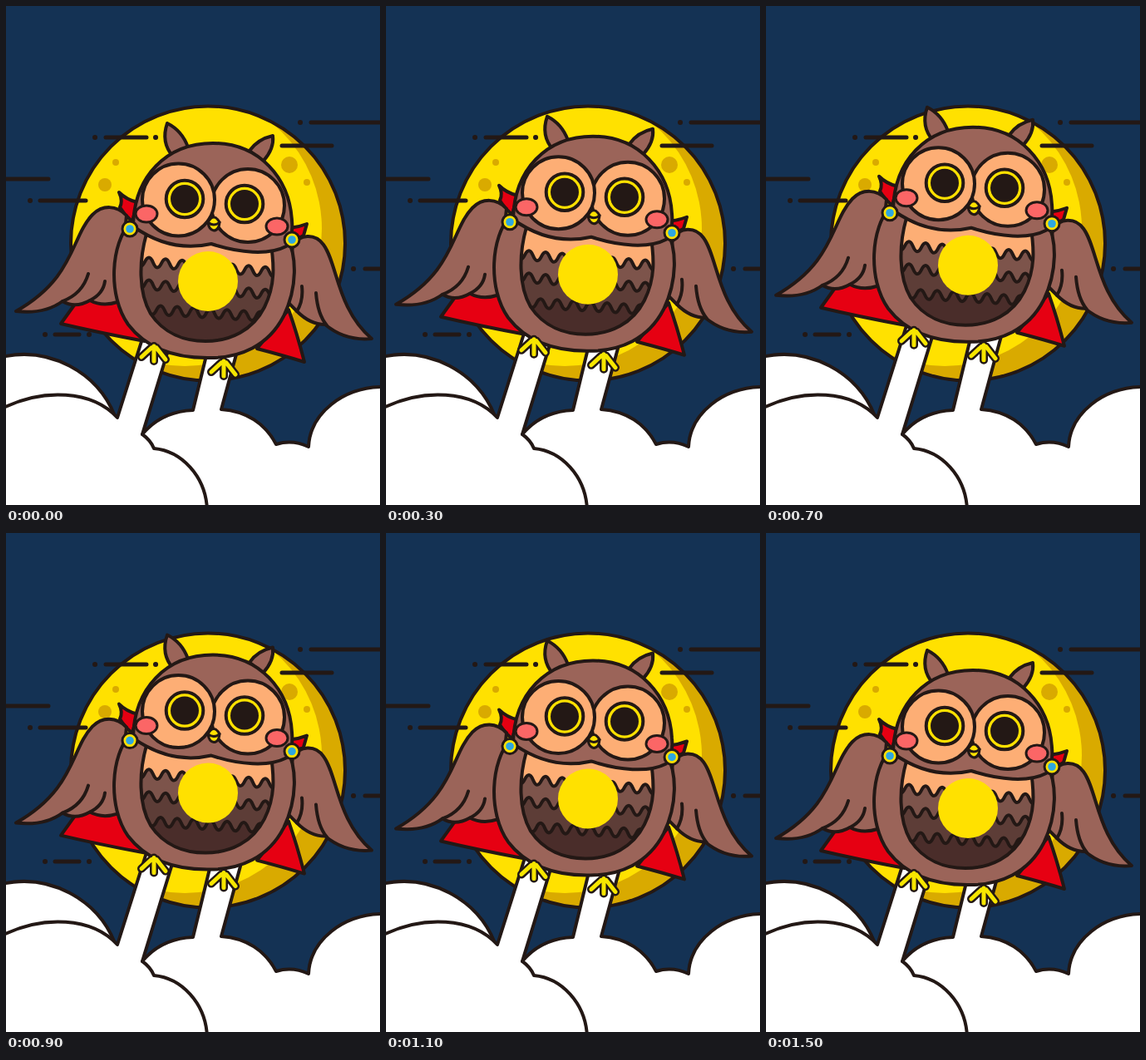
Write an HTML page that moves like this. It is 450 px wide and 600 px high and loops after 1.6 s.

```html
<!DOCTYPE html>
<html lang="en">
<head>
<meta charset="utf-8">
<title>Flying owl</title>
<style>
html, body { margin: 0; width: 100%; height: 100%; overflow: hidden; background: #143254; }
svg { display: block; width: 450px; height: 600px; }
.ink { stroke: #231815; stroke-width: 4; stroke-linecap: round; stroke-linejoin: round; }
.brown { fill: #9b6459; }
.red { fill: #e60012; }
.peach { fill: #fdae75; }
.yellow { fill: #ffe100; }
.shade { fill: #d9aa00; }
.cheek { fill: #fb6666; }
.white { fill: #fff; }
.line { fill: none; }
</style>
</head>
<body>
<svg viewBox="0 0 450 600">
  <defs>
    <circle id="moon" cx="243" cy="285.5" r="165"/>
    <clipPath id="moonClip"><use href="#moon"/></clipPath>
    <path id="bellyShape" d="M169 274C160 306 159 344 174 370C190 394 215 403 240 403C270 403 297 390 311 362C324 336 323 312 318 280Z"/>
    <clipPath id="bellyClip"><use href="#bellyShape"/></clipPath>
    <g id="eye">
      <circle r="22.3" class="yellow ink"/>
      <circle r="17" fill="#231815"/>
    </g>
    <g id="earring">
      <circle r="9" class="yellow ink" style="stroke-width:3"/>
      <circle r="4.8" fill="#2ea7e0"/>
    </g>
    <path id="toes" d="M-3 0L-15 11M0 -2V16M3 0L14 14"/>
    <g id="feet">
      <use href="#toes" x="178" y="411"/>
      <use href="#toes" x="262" y="429"/>
    </g>
  </defs>

  <rect width="450" height="600" fill="#143254"/>

  <g clip-path="url(#moonClip)">
    <use href="#moon" class="shade"/>
    <circle cx="215" cy="268" r="165" class="yellow"/>
  </g>
  <g class="shade">
    <circle cx="119" cy="215" r="8"/><circle cx="132" cy="188" r="4"/>
    <circle cx="341" cy="191" r="10"/><circle cx="362" cy="212" r="4"/>
  </g>
  <use href="#moon" class="line ink"/>

  <path class="line ink" style="stroke-width:5" d="M120 158H169M367 140H455M332 168H392M-5 208H51M41 234H96M432 316H455M59 395H88"/>
  <path class="line ink" style="stroke-width:6" d="M107 158h.1M180 158h.1M354 140h.1M29 234h.1M418 316h.1M47 395h.1M100 395h.1"/>

  <g class="white ink">
    <path d="M-5 422C52 409 110 440 131 493V610H-5Z"/>
    <path d="M-5 484C45 459 104 462 134 495L172 375H207L164 515C179 497 199 487 225 486L252 375H289L259 485C289 487 312 502 325 527Q345 521 364 530C366 490 405 458 455 458V610H-5Z"/>
    <path d="M164 515Q174 522 178 532C211 535 240 565 242 605" class="line"/>
  </g>

  <g id="owl">
    <g class="red ink">
      <path d="M89 350L66 382Q113 393 167 403L140 350Z"/>
      <path d="M340 365Q350 393 359 428Q333 420 302 412Z"/>
      <path d="M136 224Q145 233 158 236L152 259Q143 252 137 242Q141 234 136 224Z"/>
      <path d="M362 262Q352 266 341 267L344 283L358 276Z"/>
    </g>
    <g class="brown ink">
      <path d="M145 252C133 239 116 239 104 251C78 278 83 327 12 367Q46 371 68 355Q83 364 101 354Q116 362 134 356Z"/>
      <path d="M345 288C353 274 372 273 382 287C399 310 398 364 440 400Q408 403 384 383Q366 383 350 367L338 355Z"/>
      <path class="line" d="M99 322Q92 346 68 355M119 331Q117 346 101 354M373 345Q375 371 386 384M356 337Q358 354 350 367"/>
      <path d="M150 260C126 285 122 348 147 383C170 413 205 423 242 423C282 424 316 408 334 373C351 338 350 300 338 278Z"/>
    </g>

    <g clip-path="url(#bellyClip)">
      <rect x="155" y="270" width="175" height="140" class="peach"/>
      <g id="bands" class="ink"></g>
    </g>
    <use href="#bellyShape" class="line ink"/>
    <circle cx="243" cy="331" r="36" class="yellow"/>

    <g class="brown ink">
      <path d="M201 181Q186 164 194 141Q212 150 219 170Z"/>
      <path d="M293 174Q303 160 321 156Q323 172 309 187Z"/>
      <path d="M153 265C154 205 193 165 249 165C305 165 341 207 344 258Q346 280 337 289C316 300 280 297 247 286C216 293 184 287 153 265Z"/>
    </g>
    <circle cx="291" cy="240" r="44" class="peach ink"/>
    <circle cx="207.5" cy="233" r="43.5" class="peach ink"/>
    <use href="#eye" x="215" y="232"/>
    <use href="#eye" x="287" y="238"/>
    <g class="yellow ink" style="stroke-width:3">
      <path d="M243 260Q250 248 257 260Q256 270 250 270Q244 269 243 260Z"/>
      <path d="M243 260Q250 266 257 260" class="line"/>
    </g>
    <g class="cheek ink" style="stroke-width:3">
      <ellipse cx="169" cy="250" rx="13" ry="10"/>
      <ellipse cx="326" cy="265" rx="13" ry="10"/>
    </g>
    <use href="#earring" x="149" y="268"/>
    <use href="#earring" x="344" y="281"/>

    <use href="#feet" class="ink line" style="stroke-width:10"/>
    <use href="#feet" class="ink line" style="stroke:#f7e600;stroke-width:5"/>
  </g>
</svg>
<script>
const owl = document.getElementById("owl");
const STEP = 100, STEPS = 16, PEAK = 8, LIFT = 22;

// A wavy feather band, starting on a crest and covering everything below.
function band(x, y, slope, color) {
  let d = `M${x} ${y}`;
  for (let i = 0; i < 20; i++) {
    const dy = (i % 2 ? -11 : 11) + slope;
    d += `c5 0 5 ${dy} 10 ${dy}`;
  }
  return `<path d="${d}V420H${x}Z" fill="${color}"/>`;
}
document.getElementById("bands").innerHTML =
  band(152, 301, 0.8, "#7d544b") +
  band(152, 328, 0.8, "#5d3d37") +
  band(146, 358, 0.6, "#4a2d2a");

// Steady rise, then a fall that slows towards the bottom.
function lift(step) {
  if (step <= PEAK) return LIFT * step / PEAK;
  return LIFT * ((STEPS - 1 - step) / (STEPS - 1 - PEAK)) ** 1.15;
}

function draw(now) {
  const step = Math.floor(now / STEP) % STEPS;
  owl.setAttribute("transform", `translate(0 ${-lift(step)})`);
  requestAnimationFrame(draw);
}
draw(performance.now());
</script>
</body>
</html>
```
